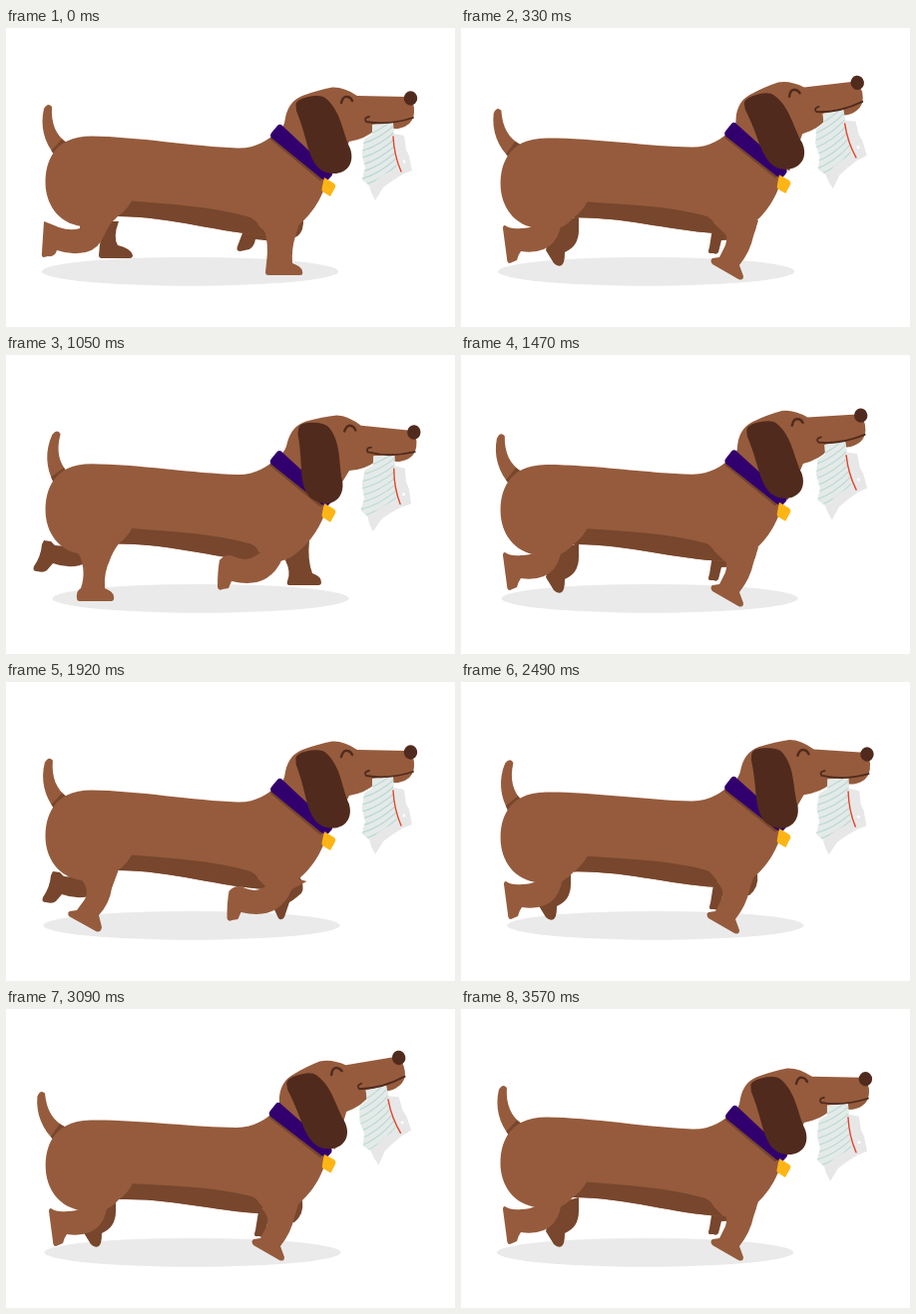
An HTML page with a canvas for the animation above (3.6 s loop, 450 by 300 pixels).

```html
<!DOCTYPE html>
<html lang="en">
<head>
<meta charset="utf-8">
<title>Dachshund with homework</title>
<style>
  html, body { margin: 0; width: 100%; height: 100%; overflow: hidden; background: #fff; }
  canvas { display: block; }
</style>
</head>
<body>
<canvas width="450" height="300"></canvas>
<script>
const ctx = document.querySelector('canvas').getContext('2d');
const COAT = '#955b3c', SHADE = '#77462c', DARK = '#502a1d';
const STEP = 30, STEPS = 120;

// Keys over half a loop; the second half mirrors the first.
const HEAD = [[0, 0], [12, 7.2], [17, 8.8], [22, 6.4], [35, -5], [37, -3.8], [48, 3.7], [56, 0], [60, -1]];
const SWAY = [[0, 0], [17, 1.5], [22, 1], [35, .4], [37, 1], [48, .8], [56, 0], [60, 0]];
const FLAP = [[0, 0], [17, 5], [24, 7.5], [36, 7.5], [56, 1.5], [60, .8]];
const DRIFT = [[0, 0], [17, 2.5], [22, 5], [35, 10.5], [37, 10.3], [56, 1.5], [60, .8]];

// Smooth curve through the keys, level at both ends.
function curve(keys, x) {
  const i = Math.max(1, keys.findIndex(key => key[0] >= x));
  const slope = n => keys[n - 1] && keys[n + 1]
    ? (keys[n + 1][1] - keys[n - 1][1]) / (keys[n + 1][0] - keys[n - 1][0]) : 0;
  const [x0, y0] = keys[i - 1], [x1, y1] = keys[i];
  const w = x1 - x0, u = (x - x0) / w, v = 1 - u;
  return y0 * v * v * (1 + 2 * u) + y1 * u * u * (1 + 2 * v)
    + w * u * v * (v * slope(i - 1) - u * slope(i));
}

function fill(color, d) {
  ctx.fillStyle = color;
  ctx.fill(new Path2D(d));
}

function stroke(color, width, d) {
  ctx.strokeStyle = color;
  ctx.lineWidth = width;
  ctx.lineCap = 'round';
  ctx.stroke(new Path2D(d));
}

function turn(degrees, x, y, draw) {
  ctx.save();
  ctx.translate(x, y);
  ctx.rotate(degrees * Math.PI / 180);
  ctx.translate(-x, -y);
  draw();
  ctx.restore();
}

function ellipse(color, x, y, rx, ry) {
  ctx.fillStyle = color;
  ctx.beginPath();
  ctx.ellipse(x, y, rx, ry, 0, 0, 7);
  ctx.fill();
}

// Each leg goes from planted (0) to kicked back (5): [path, dx, dy].
const nearFront = {
  plant: 'M258 200 Q264 216 261 236 L260 245 Q260 248 263 248 L295 248 Q298 248 297 244 Q296 239 287 236 Q286 222 290 209 L295 193 L270 190Z',
  tilt: 'M258 200 Q267 208 263 218 L257 230 L250 231 Q247 233 250 237 L276 252 Q281 254 281 249 L277 238 Q288 224 291 209 L296 193 L270 190Z',
  kick: 'M214 206 Q212 216 212 233 Q213 237 217 235 L223 234 L226 227 Q248 232 261 224 Q272 217 277 204 L292 196 L270 190 L249 202 Q241 208 228 202 Q220 199 214 206Z'
};
const farFront = {
  plant: 'M304 186 Q302 206 307 219 Q316 222 316 228 Q316 231 313 231 L284 231 Q281 231 282 227 Q286 218 280 206 L282 190Z',
  tilt: 'M290 188 Q301 204 296 212 Q288 219 284 221 L279 236 Q276 240 273 237 L265 220 L268 203Z',
  kick: 'M298 190 Q299 204 292 209 Q276 216 250 212 Q249 219 244 222 L235 224 Q230 224 232 219 L238 203 L270 195Z',
  swing: 'M297 192 Q299 206 289 214 L262 215 L259 227 Q257 230 254 228 L250 228 Q248 227 250 222 L253 203 L280 195Z'
};
const nearHind = {
  plant: 'M70 194 Q82 214 75 234 Q70 237 71 244 Q71 247 74 247 L105 247 Q109 247 108 242 Q107 237 99 234 Q98 218 104 206 Q107 197 114 188 L85 180Z',
  tilt: 'M72 194 Q85 207 79 218 L71 229 L64 230 Q61 231 63 235 L90 250 Q95 252 96 246 L93 234 Q104 222 106 207 L113 188 L85 180Z',
  kick: 'M38 194 Q46 197 53 200 Q65 204 74 201 L74 192 L112 188 Q103 197 99 207 Q93 222 80 225 Q65 228 51 223 Q49 230 42 229 L38 230 Q35 230 36 225Z',
  swing: 'M45 200 Q51 204 61 203 Q70 203 75 200 L74 192 L112 188 Q101 196 100 205 Q96 219 84 224 Q74 228 61 226 Q58 230 57 235 L50 238 Q47 238 47 233 L43 203 Q43 200 45 200Z'
};
const farHind = {
  plant: 'M101 194 Q94 208 93 228 Q93 231 96 231 L124 231 Q127 231 127 228 Q125 221 112 218 Q107 210 113 194Z',
  tilt: 'M88 196 L81 223 L89 236 Q93 240 97 238 Q100 236 100 225 Q114 219 114 203 L114 189Z',
  kick: 'M38 186 L45 187 L49 191 Q64 193 80 190 L82 208 Q66 216 47 209 L41 216 Q38 219 31 217 Q26 217 28 212 Q35 202 36 190Z'
};

const early = (leg, stride, x) => [[leg.plant, 0, 0], [leg.tilt, stride, 0], [leg.tilt, 0, 0],
  [leg.tilt, -stride, 0], [leg.kick, x, 4], [leg.kick, 0, 0]];
const late = leg => [[leg.plant, 0, 0], [leg.tilt, 0, 0], [leg.swing, 0, 0],
  [leg.swing, 0, 0], [leg.swing, -1, -2], [leg.kick, 0, 0]];
const legs = {
  nearFront: early(nearFront, 2, 9.5), farHind: early(farHind, 4, 9),
  farFront: late(farFront), nearHind: late(nearHind)
};

function leg(name, pose, color) {
  const [d, dx, dy] = legs[name][pose];
  ctx.save();
  ctx.translate(dx, dy);
  fill(color, d);
  ctx.restore();
}

function paper() {
  ctx.save();
  ctx.clip(new Path2D('M367 97 L388 95 L389 106 L399 108 L401 122 L404 128 L407 143 L397 147 L386 154 L378 160 L370 173 L366 165 L364 158 L357 152 L360 140 L357 127 L359 112 L367 107Z'));
  fill('#e7e7e7', 'M350 90H412V180H350Z');
  ctx.clip(new Path2D('M350 90H388V108Q388 128 394 141Q378 144 366 158H350Z'));
  fill('#e4eae8', 'M350 90H412V180H350Z');
  for (let y = 91; y < 156; y += 7) {
    stroke('#b9d9d3', 1.1, `M354 ${y + 19} Q374 ${y + 14} 391 ${y - 2}`);
  }
  ctx.restore();
  stroke('#e2452c', 1.4, 'M388 109 Q389 128 396 144');
  ellipse('#fff', 399, 134, 1.5, 1.5);
}

function head(nod) {
  fill(COAT, 'M272 106 Q279 100 280 90 C282 80 287 72 297 68 Q313 62 327 59.5 Q339 59 352 68 L402 69 Q410 74 409 85 Q408 98 393 101 L370 102 Q361 111 344 114 L326 149Z');
  turn(.35 * nod, 378, 96, paper);
  ellipse(DARK, 405.5, 70.5, 6.7, 7.2);
  stroke(DARK, 2.4, 'M336 75 Q338 68 342 69 Q345 69 347 73');
  stroke(DARK, 1.8, 'M364 89 Q358 90 361 94 Q383 98 408 90');
}

function ear() {
  fill(DARK, 'M290.5 77 Q290.5 72 301 69.5 Q316 66 321 71 C336 84 337 104 345 121 C350 136 341 146 329 146 C312 146 306 133 301 114 Q296 95 291 83Z');
}

function collar() {
  stroke(SHADE, 4, 'M267 111 L315 151');
  fill('#32006e', 'M272 98 Q275 95 278 99 L326 144 Q328 147 325 150 L322 153 Q319 153 316 151 L267 111 Q263 108 267 104Z');
  fill('#fdb515', 'M319 150 L329 156 Q331 158 330 160 L325 169 L317 164 Q316 162 317 159Z');
}

function tail() {
  fill(COAT, 'M38 81 Q42 74 46 79 C45 96 50 108 62 116 L50 129 C38 115 34 98 38 81Z');
  fill(SHADE, 'M45.5 123 L56 111.5 L63 117 L50 130Z');
}

function body() {
  fill(COAT, 'M47 126 C54 115 66 108.5 86 108.5 C130 109 190 119 232 120.5 C250 121 262 113 272 104 L324 148 C318 165 312 182 293 198 C282 208 270 209 262 208 C215 206 165 189 112 189 C104 198 92 204 76 199 C52 196 39.5 176 39.5 155 C39.5 143 42 134 47 126Z');
  fill(SHADE, 'M126 173.5 C166 177 207 179 245 190 Q251 193 253 198 L263 208 C215 206 165 189 112 189 Q121 183 126 173.5Z');
}

function draw(step) {
  const half = Math.min(step, STEPS - step);
  const beat = step % 10, pose = Math.min(beat, 10 - beat);
  const nod = curve(HEAD, half), sway = curve(SWAY, half), flap = curve(FLAP, half);
  const inBody = part => turn(-1.2 * sway, 180, 150, part);
  const inHead = part => turn(-nod, 305, 120, part);

  ctx.clearRect(0, 0, 450, 300);
  ellipse('#eaeaea', 184.5 + curve(DRIFT, half), 244.3, 148.7, 14.4);
  leg('farHind', pose, SHADE);
  leg('farFront', 5 - pose, SHADE);
  inBody(() => {
    turn(.8 * flap - 1.2 * nod, 54, 122, tail);
    body();
  });
  leg('nearHind', 5 - pose, COAT);
  leg('nearFront', pose, COAT);
  inBody(() => {
    inHead(() => head(nod));
    collar();
    inHead(() => turn(flap, 305, 72, ear));
  });
}

function tick() {
  draw(Math.floor(performance.now() / STEP) % STEPS);
  requestAnimationFrame(tick);
}
tick();
</script>
</body>
</html>
```
